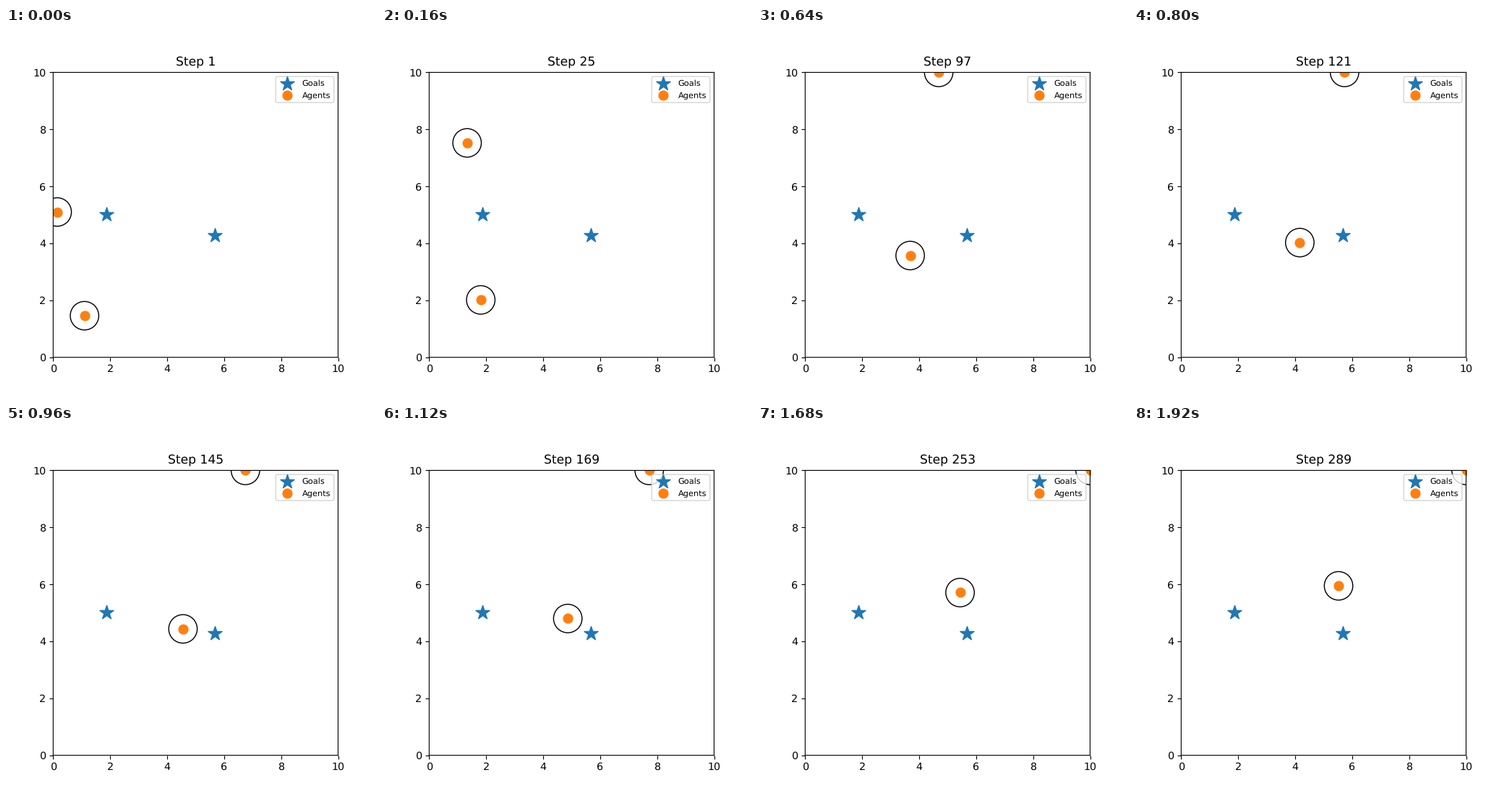
These frames come from a looping animation (512 by 512 pixels, 2 s). A matplotlib script:

```python
from math import erf

import numpy as np
import matplotlib.pyplot as plt
from matplotlib.animation import FuncAnimation
from matplotlib.patches import Circle

FRAMES, INTERVAL, STRIDE = 25, 80, 12
SIZE, RADIUS = 10, 0.5
GOALS = np.array([(1.878, 5.006), (5.675, 4.266)])

# Soft edges, as in a smoothly scaled plot
plt.rcParams.update({"path.snap": False, "text.hinting": "none"})


def drift(t, start, speed, drag):
    """Straight run that slows down steadily."""
    return start + speed * t - drag * t * t


def settle(t, start, reach, span):
    """Bell-shaped speed: quick at first, then easing to rest."""
    return start + reach * erf(t / span)


def positions(t):
    """Agent positions at time t, held inside the arena."""
    upper = drift(t, 0.14, 0.604, 0.00445), drift(t, 5.10, 1.23, 0.0085)
    lower = settle(t, 1.10, 4.50, 14.2), settle(t, 1.46, 4.93, 20)
    return np.clip([upper, lower], 0, SIZE)


fig, ax = plt.subplots(figsize=(5, 5), dpi=102.4)
ax.set(xlim=(0, SIZE), ylim=(0, SIZE), aspect="equal")

start = positions(0)
ax.scatter(*GOALS.T, s=200, marker="*", color="tab:blue", label="Goals")
agents = ax.scatter(*start.T, s=80, color="tab:orange", label="Agents")
rings = [ax.add_patch(Circle(p, RADIUS, fill=False, lw=1)) for p in start]
ax.legend(loc="upper right", fontsize=8)
title = ax.set_title("Step 1")


def update(i):
    pts = positions(i)
    agents.set_offsets(pts)
    for ring, p in zip(rings, pts):
        ring.center = p
    title.set_text(f"Step {1 + STRIDE * i}")
    return [agents, *rings, title]


anim = FuncAnimation(fig, update, frames=FRAMES, interval=INTERVAL,
                     repeat=True, repeat_delay=0)
plt.show()
```
